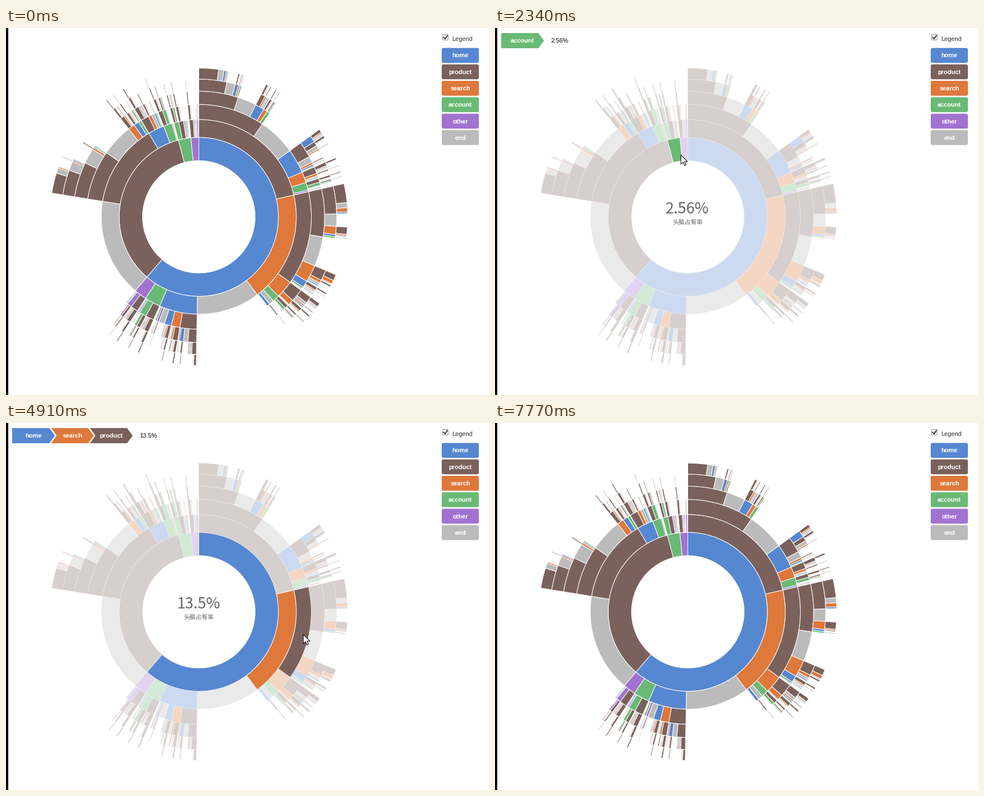
A matplotlib script for the animation above (8.09 s loop, 858x653 px).

```python
import numpy as np
import matplotlib.pyplot as plt
from matplotlib.animation import FuncAnimation
from matplotlib.collections import PolyCollection
from matplotlib.colors import to_rgb
from matplotlib.patches import FancyBboxPatch, Polygon, Rectangle

W, H, DPI = 858, 653, 100
LOOP, FRAMES = 8090, 202
STEP = LOOP / FRAMES
PX = 72 / DPI  # points per pixel
CX, CY, R = 342.5, 336, 100
MAX_DEPTH, MIN_WIDTH = 6, 0.29
FADE = 940

NAMES = dict(h="home", p="product", s="search", a="account", o="other", e="end")
COLORS = dict(h="#5687d1", p="#7b615c", s="#de783b",
              a="#6ab975", o="#a173d1", e="#bbbbbb")

# Children of each visit path with their width in degrees.
TREE = {
    "": "h220.7 p124.4 a9.2 o5.7",
    "h": "p77.1 s66.1 e37.8 h22.7 a9.4 o7.6",
    "p": "e58.5 p50 h9.6 a5.2 s.6 o.4",
    "a": "a3 p2.8 e1.3 h.7 s.5",
    "o": "p2.5 e.9 h.6 s.5 o.9",
    "hp": "p34.4 e19.6 h12.6 s5.6 a4 o.8",
    "hpp": "p18.3 e8.6 h4.2 s1.8 a1.4",
    "hppp": "p11.8 e3.6 h1.4 s.7 a.7",
    "hpppp": "p7.7 e2.1 h.9 s.5 a.4",
    "hph": "p7.4 e2.9 s1 h.8 a.4",
    "hphp": "h2.9 p1.9 e1.5 s.6",
    "hs": "p48.6 s9.2 a3.6 e2.5 h1.5",
    "hsp": "p22.14 e13.7 s7.9 h3.1 a.9 o.4",
    "hspp": "p11.7 e5.2 s3.4 h.9 a.7",
    "hsppp": "p7.4 e2 s1.6 h.6",
    "hspps": "p2.8 s.5",
    "hsps": "p4.5 s1.3 e1 h.6",
    "hspsp": "p2.4 s1.5 e.5",
    "hss": "p6 s2.6 e.4",
    "hh": "p8.7 s4.5 h3.6 e3 o1.2 a.9",
    "hhp": "p4 e2.1 h1.8 s.6",
    "ha": "p4.3 a3.6 o.7 h.5",
    "ho": "p3.8 o2.4 h.5 a.5",
    "pp": "p25.6 e16.7 s3.4 h2.7 a1.4",
    "ppp": "p16.2 e7.1 s1 h.5 a.6",
    "pppp": "p10.6 e3.9 s.6 h.5",
    "ppppp": "p7.9 e2.1 s.5",
    "ph": "p4.2 s1.7 e1.5 h.9 a.6",
}
# Shares used for every narrower branch.
MIX = dict(p="p.5 e.2 s.12 h.1 a.06", s="p.55 s.2 e.12 h.08",
           h="p.45 s.18 e.17 h.12", a="p.45 a.35 e.1 h.06", o="p.5 o.3 h.1")

# Pointer path: time, x, y.
PATH = np.array([
    (70, 776, 640), (610, 548, 353), (675, 542.5, 348), (800, 407, 330),
    (1420, 369, 327), (1700, 369, 327), (2050, 352, 262), (2200, 338, 222),
    (2340, 330.5, 226), (2500, 315, 217), (2580, 290, 219), (3000, 218, 310),
    (3360, 238, 408), (3560, 258, 425), (3680, 271, 423), (3740, 275, 421),
    (4210, 370, 400), (4600, 465, 395), (4700, 482, 385), (4910, 529, 376),
    (5060, 536, 370), (5130, 541, 362), (5500, 552, 352), (5910, 574, 361),
    (6340, 605, 360), (6740, 605, 360), (6800, 640, 372), (7000, 715, 403),
    (7250, 812, 533), (7500, 850, 642), (7560, 856, 660)])
ARROW = np.array([(0, 0), (0, 16.5), (3.8, 13), (6.5, 18.8),
                  (9, 17.7), (6.4, 12), (11.7, 12)])


def grow(path="", start=0, width=360):
    """List (path, start, end) of all visible nodes, parents first."""
    if path.endswith("e") or len(path) == MAX_DEPTH:
        return []
    scale = 1 if path in TREE else width
    nodes = []
    for item in TREE.get(path, MIX.get(path[-1:])).split():
        kid, w = path + item[0], float(item[1:]) * scale
        if w >= MIN_WIDTH:
            nodes.append((kid, start, start + w))
            nodes += grow(kid, start, w)
        start += w
    return nodes


def wedge(path, a0, a1):
    a = np.radians(np.linspace(a0, a1, int((a1 - a0) / 1.5) + 3))
    arc = np.column_stack([np.sin(a), -np.cos(a)])
    inner, outer = R * np.sqrt(len(path)), R * np.sqrt(len(path) + 1)
    return np.vstack([arc * outer, arc[::-1] * inner]) + (CX, CY)


def pointer(t):
    return [np.interp(t, PATH[:, 0], PATH[:, i]) for i in (1, 2)]


def find(x, y):
    dx, dy = x - CX, CY - y
    depth = int((dx * dx + dy * dy) / R ** 2)
    angle = np.degrees(np.arctan2(dx, dy)) % 360
    return next((n for n in NODES
                 if len(n[0]) == depth and n[1] <= angle < n[2]), None)


def ease(u):
    return 4 * u ** 3 if u < 0.5 else 1 - 4 * (1 - u) ** 3


def timeline():
    """Pointer position, hovered node and opacity of the rest, per frame."""
    hover, left, out = None, None, []
    for k in range(FRAMES):
        t = (k + 0.5) * STEP
        x, y = pointer(t)
        if np.hypot(x - CX, y - CY) < 300:
            hover = find(x, y) or hover
        elif hover:
            hover, left = None, t
        if hover:
            rest = 0.3
        elif left is None:
            rest = 1
        else:
            rest = 0.3 + 0.7 * ease(min((t - left) / FADE, 1))
        shown = PATH[0, 0] <= t <= PATH[-1, 0]
        out.append((x, y, shown, hover, rest))
    return out


NODES = grow()
STATES = timeline()

fig = plt.figure(figsize=(W / DPI, H / DPI), dpi=DPI, facecolor="white")
ax = fig.add_axes([0, 0, 1, 1])
ax.set_xlim(0, W)
ax.set_ylim(H, 0)
ax.axis("off")


def label(x, y, s, size=11, color="white", weight="bold", ha="center",
          font="Liberation Sans"):
    return ax.text(x, y, s, fontsize=size * PX, color=color, weight=weight,
                   ha=ha, va="baseline", family=font)


# Sunburst
wheel = PolyCollection([wedge(*n) for n in NODES], linewidths=PX)
ax.add_collection(wheel)
fills = np.array([(*to_rgb(COLORS[n[0][-1]]), 1) for n in NODES])
edges = np.ones_like(fills)

# Left bar and legend
ax.add_patch(Rectangle((0, 0), 4, H, color="black", lw=0))
ax.add_patch(FancyBboxPatch((776.5, 12.5), 8, 8, ec="#9a9a9a", fc="#f4f4f4",
                            boxstyle="round,pad=1,rounding_size=1.5", lw=PX))
ax.plot([777.5, 779.8, 784], [16.8, 19.3, 13.6], color="#404040", lw=2 * PX)
label(792, 23, "Legend", color="#333333", weight="normal", ha="left")
for i, key in enumerate(NAMES):
    y = 35.5 + 29.25 * i
    ax.add_patch(FancyBboxPatch((774, y), 66, 26.5, fc=COLORS[key], lw=0,
                                boxstyle="round,pad=0,rounding_size=3"))
    label(807, y + 17, NAMES[key])

# Breadcrumb trail
CW, CH, GAP, TIP, LEFT, TOP = 66, 27, 3, 10, 11, 9
crumbs = []
for i in range(MAX_DEPTH):
    pts = [(0, 0), (CW, 0), (CW + TIP, CH / 2), (CW, CH), (0, CH)]
    if i:
        pts.append((TIP, CH / 2))
    x = LEFT + i * (CW + GAP)
    shape = ax.add_patch(Polygon(np.array(pts) + (x, TOP), lw=0))
    crumbs.append((shape, label(x + (CW + TIP) / 2, 26, "")))
trail_pct = label(0, 26, "", color="black", weight="normal")

# Centre text
big = label(342, 330, "", 27, "#666666", "normal", font="Noto Sans CJK JP")
note = label(342, 349, "头脑占有率", 10.8, "#666666", "normal",
             font="Noto Sans CJK JP")

arrow = ax.add_patch(Polygon(ARROW, fc="white", ec="black", lw=PX, zorder=9))


def draw(k):
    x, y, shown, hover, rest = STATES[k]
    path = hover[0] if hover else ""
    alpha = [1 if path.startswith(n[0]) else rest for n in NODES]
    fills[:, 3] = edges[:, 3] = alpha
    wheel.set_facecolor(fills)
    wheel.set_edgecolor(edges)

    for i, (shape, text) in enumerate(crumbs):
        on = i < len(path)
        shape.set_visible(on)
        text.set_visible(on)
        if on:
            shape.set_facecolor(COLORS[path[i]])
            text.set_text(NAMES[path[i]])
    pct = f"{(hover[2] - hover[1]) / 3.6:#.3g}%" if hover else ""
    trail_pct.set_text(pct)
    trail_pct.set_x(LEFT + (len(path) + 0.5) * (CW + GAP))
    big.set_text(pct)
    note.set_visible(bool(hover))

    arrow.set_visible(shown)
    arrow.set_xy(ARROW + (x, y))
    return ()


anim = FuncAnimation(fig, draw, frames=FRAMES, interval=STEP,
                     repeat=True, repeat_delay=0)
plt.show()
```
